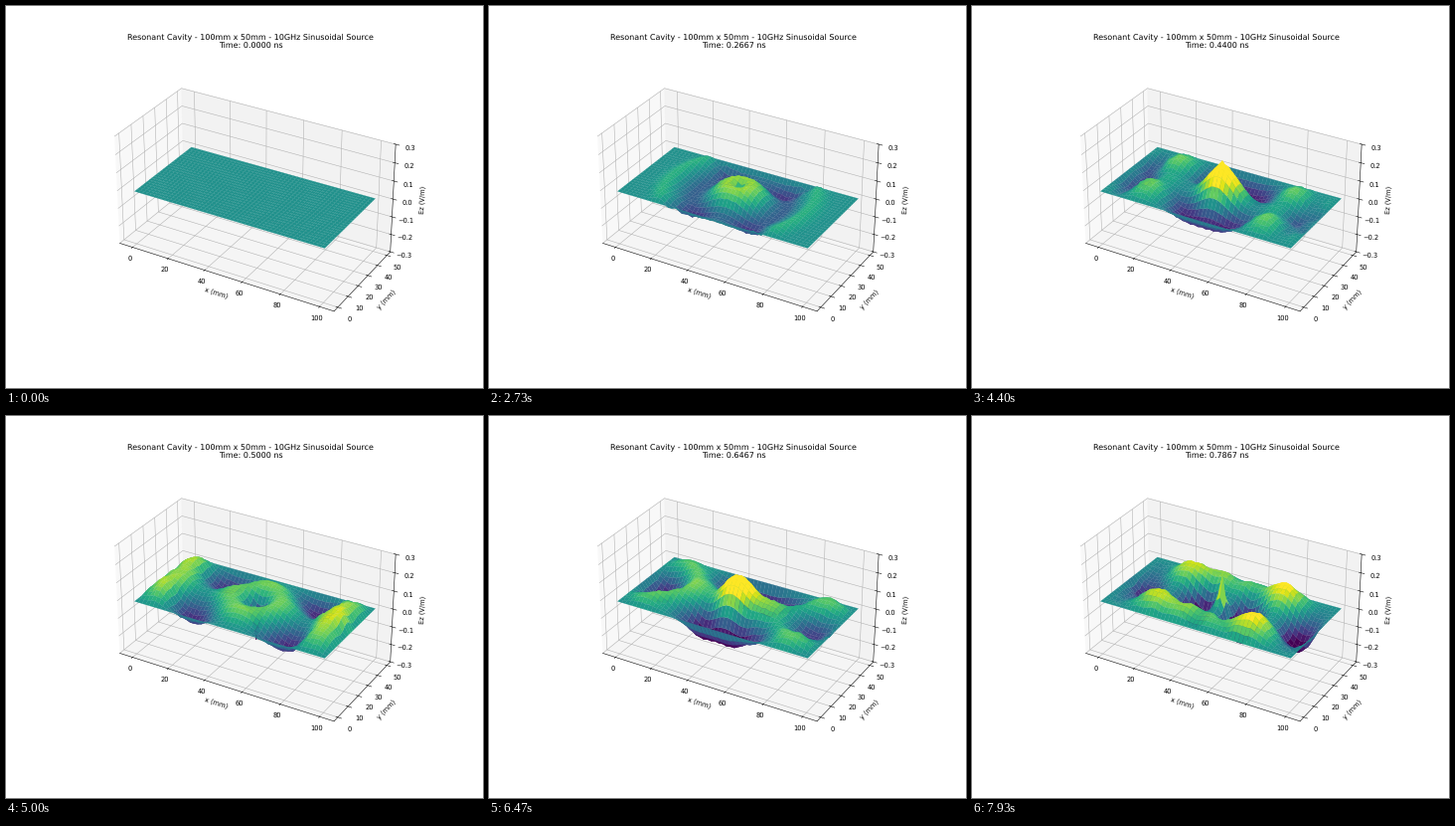
Recreate the animation shown at these times as a matplotlib script. Size 480x384 px, loop 8 s.

```python
import numpy as np
import matplotlib.pyplot as plt
from matplotlib.animation import FuncAnimation

FRAMES, LOOP_MS = 120, 8000
NX, NY = 50, 25          # grid points, 2 mm apart
COURANT = 0.5            # cells travelled per time step, one step per frame
WAVELENGTH = 15          # cells
SOURCE = NX // 2, NY // 2
NS_PER_FRAME = 1 / 150
Z_COLOUR = 0.1           # field strength at the ends of the colour map


def simulate():
    """Ez in a box with conducting walls, driven by a sine at the middle."""
    ez = np.zeros((NX, NY))
    hx = np.zeros((NX, NY - 1))
    hy = np.zeros((NX - 1, NY))
    omega = 2 * np.pi * COURANT / WAVELENGTH
    fields = []
    for step in range(FRAMES):
        hx -= COURANT * np.diff(ez, axis=1)
        hy += COURANT * np.diff(ez, axis=0)
        curl = np.diff(hy, axis=0)[:, 1:-1] - np.diff(hx, axis=1)[1:-1]
        ez[1:-1, 1:-1] += COURANT * curl
        ez[SOURCE] += COURANT * np.sin(omega * step)
        fields.append(ez.copy())
    return fields


def quads(a):
    """The four corner values of every cell, one row per cell."""
    corners = a[:-1, :-1], a[1:, :-1], a[1:, 1:], a[:-1, 1:]
    return np.stack([c.ravel() for c in corners], axis=1)


plt.rcParams["text.hinting"] = "none"
fields = simulate()
x, y = np.meshgrid(np.linspace(0, 100, NX), np.linspace(0, 50, NY),
                   indexing="ij")
qx, qy = quads(x), quads(y)

fig = plt.figure(figsize=(10, 8), dpi=48)
ax = fig.add_subplot(projection="3d")
surface = ax.plot_surface(x, y, np.zeros_like(x), rstride=1, cstride=1,
                          color="teal", shade=False, linewidth=0.3)
ax.set_box_aspect((2, 1, 1))
ax.set_xlim(-7.29, 107.29)
ax.set_ylim(-3.65, 53.65)
ax.set_zlim(-0.3, 0.3)
ax.set_xlabel("x (mm)")
ax.set_ylabel("y (mm)")
ax.set_zlabel("Ez (V/m)")


def update(i):
    qz = quads(fields[i])
    colours = plt.cm.viridis(0.5 + qz.mean(axis=1) / (2 * Z_COLOUR))
    surface.set_verts(list(np.stack([qx, qy, qz], axis=2)))
    surface.set_facecolor(colours)
    surface.set_edgecolor(colours)
    ax.set_title("Resonant Cavity - 100mm x 50mm - 10GHz Sinusoidal Source\n"
                 f"Time: {i * NS_PER_FRAME:.4f} ns")
    return surface,


anim = FuncAnimation(fig, update, frames=FRAMES, interval=LOOP_MS / FRAMES,
                     repeat=True, repeat_delay=0, blit=False)
plt.show()
```
